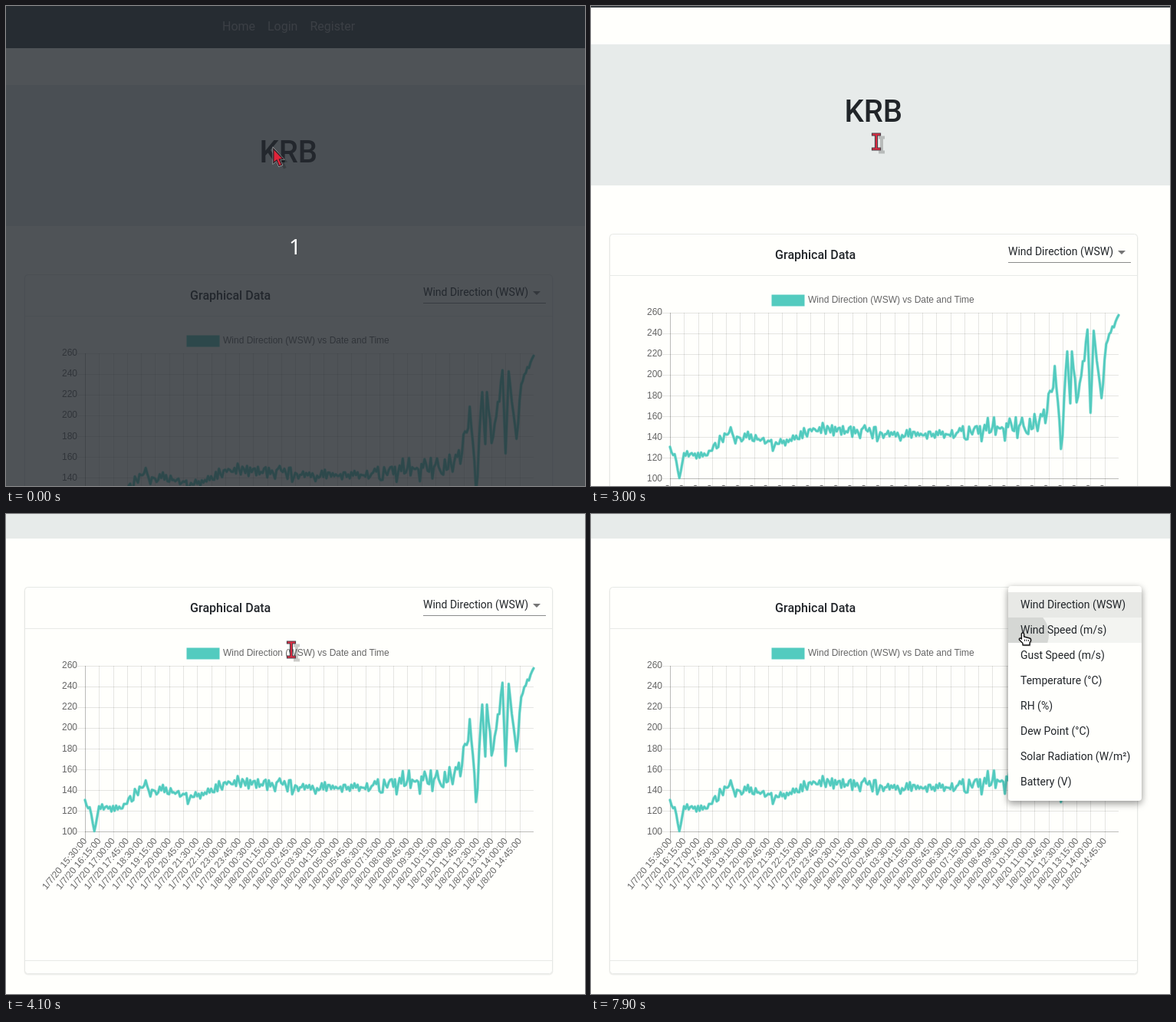
Animation, 755 px wide and 626 px high, one loop 8 s. Source, as an HTML page:

```html
<!DOCTYPE html>
<html lang="en">
<head>
<meta charset="utf-8">
<title>Weather station page</title>
<style>
html, body { margin: 0; width: 100%; height: 100%; overflow: hidden; background: #fffffc; }
svg { display: block; width: 755px; height: 626px; font-family: Roboto, sans-serif; }
.chart { font: 12px "Liberation Sans", Arial, sans-serif; fill: #666; }
.grid { fill: none; stroke: #000; stroke-opacity: .1; }
.line { fill: none; stroke: #53cbbf; stroke-linejoin: round; stroke-linecap: round; }
#menu { font-size: 14px; fill: #212529; transform-origin: 560px 118px; }
#paper { filter: drop-shadow(0 4px 5px rgba(0,0,0,.3)) drop-shadow(0 1px 4px rgba(0,0,0,.15)); }
.shadow { opacity: .2; filter: blur(.6px); }
</style>
</head>
<body>
<svg viewBox="0 0 755 626">
  <defs>
    <path id="arrowShape" d="M.8 1.2V19.5L5 16L8 23.5L11.6 22L8.5 15L13.4 14.5Z"/>
    <path id="beamShape" d="M-4-9.5H4M0-9.5V9.5M-4 9.5H4" fill="none"/>
    <path id="handShape" d="M-1.6 1Q0-1.2 1.6 1V5L9 7Q11 7.6 10.6 10L9 13V16H0V13.5L-4.6 9Q-5 6.6-2.6 7L-1.6 8Z"/>
    <clipPath id="row"><rect x="544" y="135" width="174" height="33"/></clipPath>
  </defs>
  <g id="page">
    <rect width="755" height="55" fill="#343a40"/>
    <g font-size="16" fill="#fff" fill-opacity=".5">
      <text id="home" x="282" y="32">Home</text>
      <text x="341" y="32">Login</text>
      <text x="396.5" y="32">Register</text>
    </g>
    <rect y="103" width="755" height="184" fill="#e7ebea"/>
    <text x="368.3" y="204" font-size="40" font-weight="500" text-anchor="middle" fill="#212529">KRB</text>
    <rect x="24.5" y="351.5" width="688" height="504" rx="4" fill="none" stroke="#000" stroke-opacity=".06" stroke-width="2"/>
    <rect x="24.5" y="350.5" width="688" height="504" rx="4" fill="#fffffc" stroke="#e6e8e5"/>
    <path d="M25 404.5H712M25 837.5H712" stroke="#e8eae7"/>
    <text x="292.7" y="383" font-size="16" font-weight="500" text-anchor="middle" fill="#212529">Graphical Data</text>
    <text x="544" y="378" font-size="14" fill="#212529">Wind Direction (WSW)</text>
    <path d="M687 372H697L692 377Z" fill="#757575"/>
    <rect id="under" x="544" y="387" width="160" height="1" fill="#8b8c8b"/>
    <g class="chart">
      <rect x="235.5" y="429.5" width="43" height="15" fill="#53cbbf"/>
      <text x="283" y="440">Wind Direction (WSW) vs Date and Time</text>
      <g id="axes"></g>
    </g>
  </g>
  <g id="menu">
    <rect id="paper" x="544" y="94" width="174" height="280" rx="4" fill="#fffffc"/>
    <rect x="544" y="102" width="174" height="33" fill="#e8e9e6"/>
    <rect id="hover" x="544" y="135" width="174" height="33" fill="#f3f4f1"/>
    <circle id="ripple" cx="562" cy="157" clip-path="url(#row)"/>
  </g>
  <g id="veil">
    <rect width="755" height="626" fill="#23282f" fill-opacity=".8"/>
    <text x="377" y="324" font-size="28" font-family="Noto Sans, sans-serif" text-anchor="middle" fill="#fff">1</text>
  </g>
  <g id="cursor">
    <g id="arrow">
      <use href="#arrowShape" class="shadow" x="6" y="4"/>
      <use href="#arrowShape" fill="#e0243a" stroke="#fff" stroke-opacity=".6" stroke-width="2.4"/>
      <use href="#arrowShape" fill="#e0243a" stroke="#2b2026" stroke-width="1.3"/>
    </g>
    <g id="beam">
      <use href="#beamShape" class="shadow" x="7" y="4" stroke="#000" stroke-width="4"/>
      <use href="#beamShape" stroke="#4a4048" stroke-width="4.2" stroke-linecap="square"/>
      <use href="#beamShape" stroke="#dc2c42" stroke-width="2" stroke-linecap="square"/>
    </g>
    <g id="hand">
      <use href="#handShape" class="shadow" x="1.5" y="1.5"/>
      <use href="#handShape" fill="#fff" stroke="#111" stroke-width="1.4" stroke-linejoin="round"/>
      <path d="M2.5 8.5V11M5 8.5V11M7.5 9V11" stroke="#111" stroke-width=".9"/>
    </g>
  </g>
</svg>
<script>
const $ = id => document.getElementById(id);
const clamp = v => Math.max(0, Math.min(1, v));
const glide = (t, start, length) => Math.sin(clamp((t - start) / length) * Math.PI / 2);

function add(parent, tag, attrs, text = '') {
  const el = document.createElementNS('http://www.w3.org/2000/svg', tag);
  for (const k in attrs) el.setAttribute(k, attrs[k]);
  el.textContent = text;
  parent.append(el);
  return el;
}

let seed = 11;
const rand = () => (seed = seed * 16807 % 2147483647) / 2147483647;

// Turning points of the wind curve: [sample, degrees]. Jitter fills the gaps.
const turns = [[0, 131], [3, 124], [6, 101], [9, 125], [24, 123], [37, 143], [70, 134], [93, 148],
  [160, 142], [203, 147], [241, 154], [247, 209], [251, 129], [255, 223], [257, 173], [258, 223],
  [261, 174], [268, 244], [270, 164], [272, 243], [277, 178], [280, 230], [288, 258]];

function reading(i) {
  const n = Math.max(1, turns.findIndex(k => k[0] >= i));
  const [a, from] = turns[n - 1], [b, to] = turns[n];
  const spread = i < 30 ? 5 : i < 200 ? 8 : i < 275 ? 16 : 5;
  const jitter = i === a || i === b ? 0 : (rand() + rand() - 1) * spread;
  return from + (to - from) * (i - a) / (b - a) + jitter;
}

function buildChart() {
  const axes = $('axes'), step = 585 / 288;
  const yOf = v => 453.5 + (260 - v) * 1.353;
  const two = n => String(n).padStart(2, '0');
  let grid = '', d = '';
  for (let v = 100; v <= 260; v += 20) {
    grid += `M93 ${Math.floor(yOf(v)) + .5}H688`;
    add(axes, 'text', { x: 93, y: Math.round(yOf(v) + 2.8), 'text-anchor': 'end' }, v);
  }
  for (let i = 0; i < 32; i++) {
    const x = 103 + i * 9 * step, min = 930 + i * 45;
    grid += `M${Math.round(x) + .5} 453V680`;
    const label = `1/${min < 1440 ? 7 : 8}/20 ${two(Math.floor(min / 60) % 24)}:${two(min % 60)}:00`;
    add(axes, 'text', { transform: `translate(${x} 679) rotate(-50)`, y: 4, 'text-anchor': 'end' }, label);
  }
  for (let i = 0; i <= 288; i++)
    d += `${i ? 'L' : 'M'}${(103 + i * step).toFixed(1)} ${yOf(reading(i)).toFixed(1)}`;
  add(axes, 'path', { d: grid, class: 'grid' });
  add(axes, 'path', { d: 'M103.5 453V680M103 669.5H688', class: 'grid' }).style.strokeOpacity = .18;
  add(axes, 'path', { d, class: 'line', 'stroke-width': 4, opacity: .4 });
  add(axes, 'path', { d, class: 'line', 'stroke-width': 2.7 });
}

['Wind Direction (WSW)', 'Wind Speed (m/s)', 'Gust Speed (m/s)', 'Temperature (°C)', 'RH (%)',
  'Dew Point (°C)', 'Solar Radiation (W/m²)', 'Battery (V)'
].forEach((name, i) => add($('menu'), 'text', { x: 560, y: 123 + i * 33 }, name));
buildChart();

// Pointer moves: start, length, dx, dy.
const moves = [[100, 600, -47, -147], [1800, 100, -1, 3], [1900, 400, 59, 108], [2400, 200, 13, 28],
  [4400, 900, 163, -37], [5300, 400, 30, -14], [6900, 100, 0, 7], [7100, 200, -2, 22]];

function pointer(t) {
  let x = 348, y = 185;
  for (const [start, length, dx, dy] of moves) {
    const p = glide(t, start, length);
    x += dx * p;
    y += dy * p;
  }
  return [Math.round(x), Math.round(y)];
}

function draw(t) {
  const scroll = 53 * glide(t, 2800, 200) + 104 * glide(t, 3300, 500) + 98 * glide(t, 3852, 248);
  $('page').setAttribute('transform', `translate(0 ${-Math.round(scroll)})`);
  $('veil').setAttribute('opacity', 1 - clamp(t / 700));

  const [x, y] = pointer(t);
  const onHome = y < 48, onSelect = x > 544;
  const kind = onHome || onSelect ? 'hand' : t >= 2500 && t < 4500 ? 'beam' : 'arrow';
  $('cursor').setAttribute('transform', `translate(${x} ${y})`);
  for (const id of ['arrow', 'beam', 'hand']) $(id).style.display = id === kind ? '' : 'none';

  $('home').setAttribute('fill-opacity', onHome ? .75 : .5);
  $('under').setAttribute('height', onSelect ? 2 : 1);
  $('under').setAttribute('fill', onSelect ? '#212529' : '#8b8c8b');

  const open = glide(t, 5900, 300);
  $('menu').style.opacity = open;
  $('menu').style.transform = `scale(${.75 + .25 * open}, ${.56 + .44 * open})`;
  $('hover').setAttribute('opacity', clamp((t - 7100) / 200));
  const press = clamp((t - 7700) / 200);
  $('ripple').setAttribute('r', 35 * press);
  $('ripple').setAttribute('fill-opacity', .14 * press);
}

// The screen refreshes ten times a second.
const start = performance.now();
function tick() {
  draw(Math.floor((performance.now() - start) % 8000 / 100) * 100);
  requestAnimationFrame(tick);
}
tick();
</script>
</body>
</html>
```
